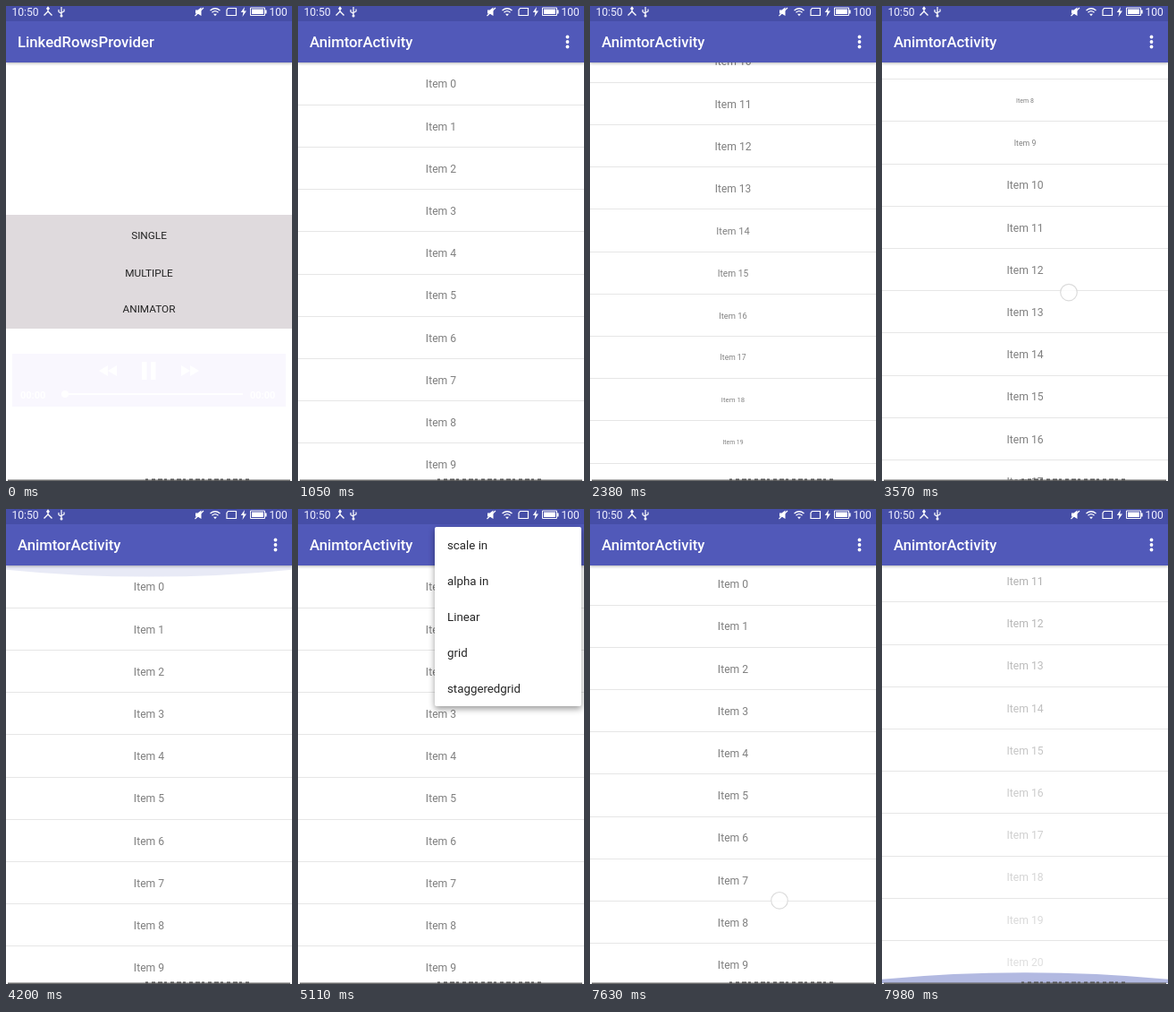
An HTML page with a canvas for the animation above (8000 ms loop, 320 by 530 pixels).

```html
<!DOCTYPE html>
<html lang="en">
<head>
<meta charset="utf-8">
<title>List animation</title>
<style>
  html, body { margin: 0; width: 100%; height: 100%; overflow: hidden; background: #fff; }
  canvas { display: block; width: 100vw; height: 100vh; }
</style>
</head>
<body>
<canvas id="stage"></canvas>
<script>
const W = 320, H = 530, LOOP = 8000;
const TOP = 63, ROW = 47.2, COUNT = 21, MAX = 525.6;
const canvas = document.getElementById('stage');
const c = canvas.getContext('2d');
const dpr = window.devicePixelRatio || 1;
canvas.width = W * dpr;
canvas.height = H * dpr;

// Scroll gestures as [time, offset] points
const FLING_DOWN = [[2040, 0], [2095, 150], [2220, 288], [2300, 385], [2344, 430], [2380, 496], [2410, MAX]];
const FLING_UP = [[3400, MAX], [3440, 472], [3525, 425], [3570, 361], [3740, 0]];
const FLING_AGAIN = [[7620, 0], [7800, 52], [7905, 477], [7930, MAX]];
const REFRESHED = 6980;

const clamp = v => Math.max(0, Math.min(1, v));
const phase = (t, a, b) => clamp((t - a) / (b - a));
const easeOut = p => 1 - (1 - p) ** 2;
const mix = (a, b, p) => a + (b - a) * p;

// Piecewise-linear lookup; from/to select the key and value columns
function lookup(points, key, from = 0, to = 1) {
  for (let i = 1; i < points.length; i++) {
    const a = points[i - 1], b = points[i];
    const p = (key - a[from]) / (b[from] - a[from]);
    if (p <= 1) return mix(a[to], b[to], clamp(p));
  }
  return points[points.length - 1][to];
}
const timeAt = (points, offset) => lookup(points, offset, 1, 0);

function scrollAt(t) {
  if (t < 3400) return lookup(FLING_DOWN, t);
  if (t < 7600) return lookup(FLING_UP, t);
  return lookup(FLING_AGAIN, t);
}

function entryTime(n, t) {
  const fromBelow = ROW * n - 467;
  if (t < 3400) return n < 10 ? 680 : timeAt(FLING_DOWN, fromBelow);
  if (n < 10) return t < REFRESHED ? timeAt(FLING_UP, ROW * (n + 1)) : REFRESHED;
  return t < 7600 ? 2400 : timeAt(FLING_AGAIN, fromBelow);
}

function text(str, x, cy, size, color, align = 'left', weight = 400) {
  c.font = `${weight} ${size}px Roboto, sans-serif`;
  c.textAlign = align;
  c.fillStyle = color;
  c.fillText(str, x, cy + size * 0.355);
}

function box(x, y, w, h, color) {
  c.fillStyle = color;
  c.fillRect(x, y, w, h);
}

function disc(x, y, r, color) {
  c.beginPath();
  c.arc(x, y, r, 0, 7);
  c.fillStyle = color;
  c.fill();
}

function shape(points, color = '#fff') {
  c.beginPath();
  points.forEach(([x, y]) => c.lineTo(x, y));
  c.fillStyle = color;
  c.fill();
}

function strokePath(d, width, color = '#fff') {
  c.strokeStyle = color;
  c.lineWidth = width;
  c.stroke(new Path2D(d));
}

// Runs draw inside a saved state with the given opacity
function layer(alpha, draw) {
  if (alpha <= 0) return;
  c.save();
  c.globalAlpha *= alpha;
  draw();
  c.restore();
}

function shadow(color, blur, dy) {
  c.shadowColor = color;
  c.shadowBlur = blur * dpr;
  c.shadowOffsetY = dy * dpr;
}

function statusBar() {
  box(0, 0, W, 17, '#464ea7');
  text('10:50', 6.5, 6.3, 12.1, '#eef');
  strokePath('M47 1.5V6L42.5 10.5M47 6L51.5 10.5M45.5 3.5L47 1.5L48.5 3.5', 1.4);
  strokePath('M62 1V11M59 4V6.5L62 8.5M65 3.5V6L62 7.5', 1.2);
  disc(62, 11, 1.5, '#fff');
  shape([[212, 4.5], [214.5, 4.5], [218.5, 1.5], [218.5, 11], [214.5, 8.5], [212, 8.5]]);
  strokePath('M211.5 11L221 2', 1.2);
  strokePath('M228.5 5Q234 0.5 239.5 5M230.5 7.2Q234 4.2 237.5 7.2', 1.3);
  shape([[232, 8.8], [236, 8.8], [234, 11.3]]);
  strokePath('M248.5 2.5H257.5V10.5H247V4.5Z', 1.2);
  shape([[267, 1], [262.8, 7], [265.5, 7], [264.5, 12], [269, 5.5], [266.2, 5.5]]);
  strokePath('M273.5 2H289.5V10.5H273.5Z', 1);
  box(275, 3.5, 13, 5.5, '#fff');
  box(290, 4.5, 1.6, 4, '#fff');
  text('100', 294.5, 6.3, 12.1, '#eef');
}

function toolbar(title) {
  layer(1, () => {
    shadow('rgba(0,0,0,.3)', 3, 1);
    box(0, 17, W, TOP - 17, '#5159b9');
  });
  text(title, 13, 40.5, 16.7, '#fff', 'left', 500);
}

function home() {
  box(0, 0, W, H, '#fff');
  toolbar('LinkedRowsProvider');
  box(0, 233, W, 127, '#dfdadd');
  text('SINGLE', 160, 256, 11.8, '#222', 'center');
  text('MULTIPLE', 160, 298, 11.8, '#222', 'center');
  text('ANIMATOR', 160, 338, 11.8, '#222', 'center');
  box(7, 388, 306, 59, '#f9f7fe');
  for (const x of [104, 114]) shape([[x, 407], [x + 10, 401], [x + 10, 413]]);
  for (const x of [196, 206]) shape([[x, 401], [x + 10, 407], [x, 413]]);
  box(152, 397, 5.5, 20, '#fff');
  box(162, 397, 5.5, 20, '#fff');
  box(68, 432, 197, 2, '#fff');
  disc(66, 433, 4, '#fff');
  text('00:00', 16, 434, 11, '#fff', 'left', 700);
  text('00:00', 273, 434, 11, '#fff', 'left', 700);
}

function glow(t, start, bottom) {
  const age = t - start;
  if (age < 0 || age > 620) return;
  const fade = phase(age, 120, 620);
  const h = age < 120 ? 28 * age / 120 : 28 * (1 - fade * 0.75);
  const edge = bottom ? 529 : TOP, dir = bottom ? -1 : 1;
  layer(0.4 * (1 - fade), () => {
    c.beginPath();
    c.moveTo(0, edge);
    c.lineTo(0, edge + dir * h * 0.35);
    c.quadraticCurveTo(W / 2, edge + dir * h * 1.55, W, edge + dir * h * 0.35);
    c.lineTo(W, edge);
    c.fillStyle = '#3f51b5';
    c.fill();
  });
}

function spinner(t) {
  if (t < 6500 || t > 7350) return;
  const y = mix(42, 102, easeOut(phase(t, 6500, 6700)));
  const size = 1 - phase(t, 7200, 7350);
  const turn = (t - 6720) * 0.007;
  const sweep = t < 6720 ? 4.6 * phase(t, 6480, 6700) : 3 + 1.6 * Math.cos((t - 6720) * 0.006);
  layer(1, () => {
    c.translate(160, y);
    c.scale(size, size);
    layer(1, () => {
      shadow('rgba(0,0,0,.3)', 4, 1);
      disc(0, 0, 17, '#fff');
    });
    c.beginPath();
    c.arc(0, 0, 7.4, turn - 1.6, turn - 1.6 + sweep);
    c.strokeStyle = '#111';
    c.lineWidth = 2.3;
    c.stroke();
  });
}

function list(t) {
  const scroll = scrollAt(t);
  c.save();
  c.beginPath();
  c.rect(0, TOP, W, H - TOP);
  c.clip();
  for (let n = 0; n < COUNT; n++) {
    const top = TOP + ROW * n - scroll;
    if (top < TOP - ROW || top > H) continue;
    const entered = phase(t - entryTime(n, t), 0, 300);
    const fading = t >= REFRESHED;
    const size = fading ? 1 : 0.5 + entered / 2;
    box(0, Math.round(top + ROW - 0.5), W, 1, '#e6e6e6');
    layer(fading ? entered : 1, () => {
      c.translate(160, top + 24);
      c.scale(size, size);
      text('Item ' + n, 0, 0, 12.2, '#808080', 'center');
    });
  }
  glow(t, 2400, true);
  glow(t, 3730, false);
  glow(t, 7928, true);
  spinner(t);
  c.restore();
}

function activity(t) {
  box(0, 0, W, H, '#fff');
  list(t);
  toolbar('AnimtorActivity');
  layer(0.2 * (1 - phase(t, 4480, 4760)) * phase(t, 4300, 4400), () => disc(301, 40, 18, '#fff'));
  for (const y of [34.5, 40, 45.5]) disc(301.5, y, 1.9, '#fff');
}

function menu(t) {
  const open = easeOut(phase(t, 4520, 4780));
  layer(open * (1 - phase(t, 5650, 5890)), () => {
    const w = 164 * mix(0.4, 1, open), h = 200 * mix(0.2, 1, open);
    layer(1, () => {
      shadow('rgba(0,0,0,.4)', 7, 3);
      c.beginPath();
      c.roundRect(317 - w, 20, w, h, 2);
      c.fillStyle = '#fff';
      c.fill();
    });
    c.beginPath();
    c.rect(317 - w, 20, w, h);
    c.clip();
    layer(0.1 * phase(t, 5500, 5600), () => box(153, 61, 164, 40, '#000'));
    ['scale in', 'alpha in', 'Linear', 'grid', 'staggeredgrid'].forEach((label, i) =>
      text(label, 167, 40.7 + 40 * i, 13.3, '#262626'));
  });
}

function touch(t, from, to, x, y) {
  if (t < from || t >= to) return;
  disc(x, y, 9.3, 'rgba(255,255,255,.8)');
  c.strokeStyle = '#dcdcdc';
  c.lineWidth = 1.2;
  c.stroke();
}

function touches(t) {
  const scroll = scrollAt(t);
  touch(t, 60, 200, 200, 332);
  touch(t, 2040, 2290, 215, 470 - scroll);
  touch(t, 3400, 3610, 209, 678.5 - scroll);
  touch(t, 4270, 4470, 301, 40);
  touch(t, 5520, 5660, 236, 79);
  touch(t, 6440, 6780, 203.5, mix(150, 307.5, easeOut(phase(t, 6450, 6720))));
  touch(t, 7620, 7830, 212, 440 - scroll);
}

function bottomEdge() {
  box(2, 528.5, 316, 1.5, '#6a6a6a');
  for (let x = 156; x < 272; x += 7) box(x, 527.5, 3 + x % 3, 2, '#555');
}

function draw(t) {
  c.setTransform(dpr, 0, 0, dpr, 0, 0);
  const opened = easeOut(phase(t, 470, 800));
  if (opened < 1) home();
  layer(opened, () => {
    c.translate(0, 42 * (1 - opened));
    activity(t);
  });
  statusBar();
  menu(t);
  touches(t);
  bottomEdge();
}

const start = performance.now();
function frame() {
  draw((performance.now() - start) % LOOP);
  requestAnimationFrame(frame);
}
frame();
</script>
</body>
</html>
```
